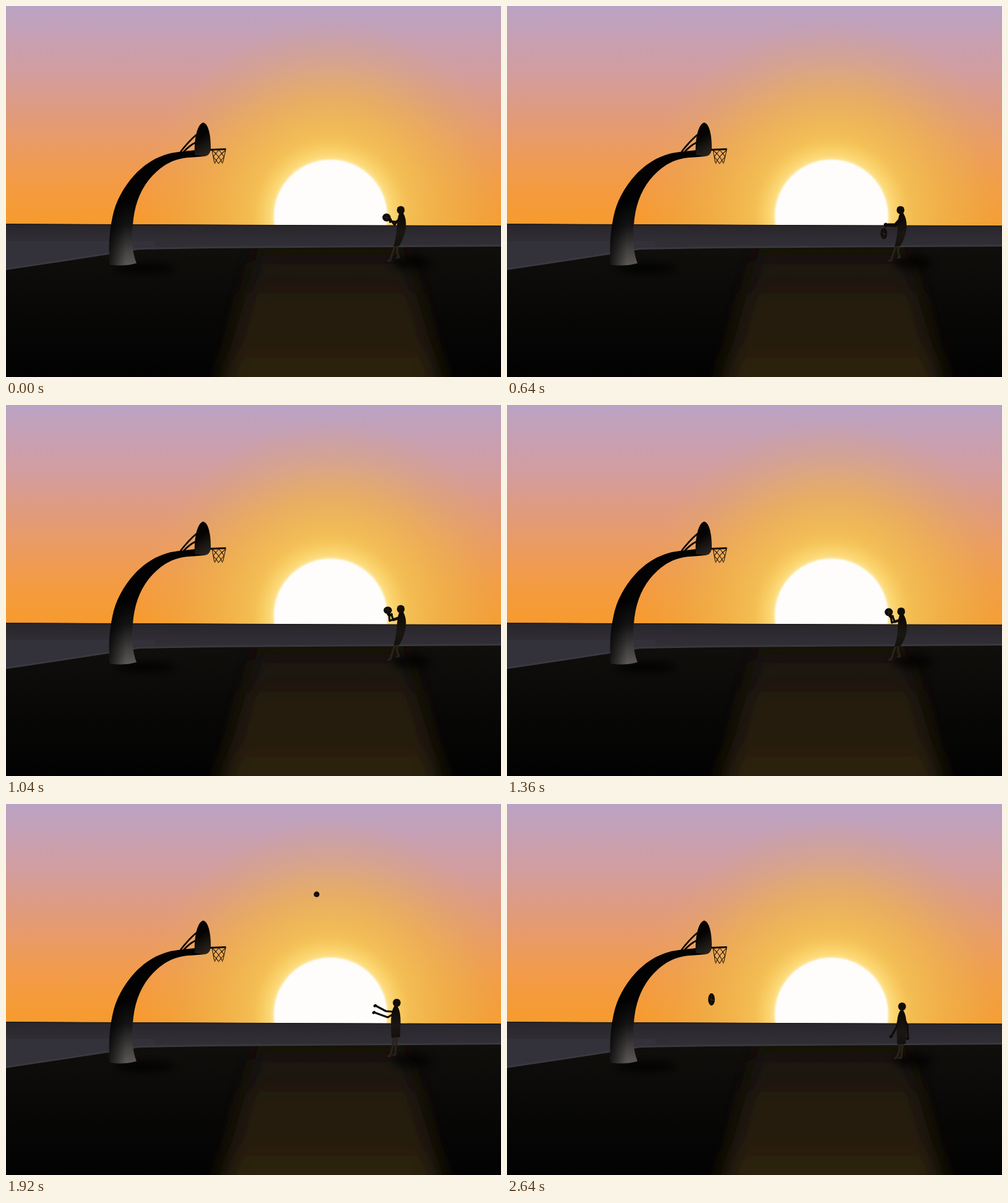
Write an HTML page that moves like this. It is 800x600 px and loops after 2.72 s.

```html
<!DOCTYPE html>
<html lang="en">
<head>
<meta charset="utf-8">
<title>Sunset shot</title>
<style>
html, body { margin: 0; width: 100%; height: 100%; overflow: hidden; background: #000; }
svg { display: block; width: 100%; height: 100%; }
</style>
</head>
<body>
<svg viewBox="0 0 800 600" preserveAspectRatio="none">
  <defs>
    <linearGradient id="sky" x2="0" y2="1">
      <stop offset="0" stop-color="#b9a3c4"/>
      <stop offset=".13" stop-color="#c5a0b5"/>
      <stop offset=".3" stop-color="#d29d9f"/>
      <stop offset=".45" stop-color="#dd9b84"/>
      <stop offset=".62" stop-color="#ea9b65"/>
      <stop offset=".8" stop-color="#f39b45"/>
      <stop offset="1" stop-color="#f79b2c"/>
    </linearGradient>
    <radialGradient id="glow" gradientUnits="userSpaceOnUse" cx="525" cy="335" r="310">
      <stop offset=".3" stop-color="#f8cd60"/>
      <stop offset=".42" stop-color="#f3c055" stop-opacity=".9"/>
      <stop offset=".62" stop-color="#eeb850" stop-opacity=".6"/>
      <stop offset=".82" stop-color="#e8b458" stop-opacity=".22"/>
      <stop offset="1" stop-color="#e4ae60" stop-opacity="0"/>
    </radialGradient>
    <radialGradient id="halo" gradientUnits="userSpaceOnUse" cx="524.5" cy="340" r="125">
      <stop offset=".7" stop-color="#fff3c4" stop-opacity=".95"/>
      <stop offset=".78" stop-color="#ffe28a" stop-opacity=".6"/>
      <stop offset="1" stop-color="#fbd060" stop-opacity="0"/>
    </radialGradient>
    <linearGradient id="sea" x2="0" y2="1">
      <stop offset="0" stop-color="#28262b"/>
      <stop offset=".5" stop-color="#2f2d33"/>
      <stop offset="1" stop-color="#333139"/>
    </linearGradient>
    <linearGradient id="ground" gradientUnits="userSpaceOnUse" x1="0" y1="390" x2="0" y2="600">
      <stop offset="0" stop-color="#100f0c"/>
      <stop offset=".4" stop-color="#0a0908"/>
      <stop offset="1" stop-color="#020202"/>
    </linearGradient>
    <linearGradient id="beam" gradientUnits="userSpaceOnUse" x1="0" y1="385" x2="0" y2="600">
      <stop offset="0" stop-color="#1d160b" stop-opacity=".5"/>
      <stop offset=".45" stop-color="#251c0c"/>
      <stop offset="1" stop-color="#2b210f"/>
    </linearGradient>
    <linearGradient id="pole" gradientUnits="userSpaceOnUse" x1="194" y1="419" x2="181" y2="318">
      <stop offset="0" stop-color="#5b5755"/>
      <stop offset=".25" stop-color="#413e3d"/>
      <stop offset=".62" stop-color="#151414"/>
      <stop offset="1" stop-color="#020202"/>
    </linearGradient>
    <linearGradient id="side" gradientUnits="userSpaceOnUse" x1="166" y1="0" x2="206" y2="0">
      <stop offset="0" stop-color="#000" stop-opacity=".75"/>
      <stop offset=".7" stop-color="#000" stop-opacity="0"/>
    </linearGradient>
    <linearGradient id="board" x1=".3" x2=".6" y2="1">
      <stop offset=".4" stop-color="#050403"/>
      <stop offset="1" stop-color="#2a241f"/>
    </linearGradient>
    <linearGradient id="cloth" x2="0" y2="1">
      <stop offset="0" stop-color="#0b0805"/>
      <stop offset=".6" stop-color="#1a1611"/>
      <stop offset="1" stop-color="#14100d"/>
    </linearGradient>
    <filter id="b1" x="-20%" y="-20%" width="140%" height="140%"><feGaussianBlur stdDeviation="1.3"/></filter>
    <filter id="b7" x="-50%" y="-100%" width="200%" height="300%"><feGaussianBlur stdDeviation="7"/></filter>
    <filter id="b22" x="-30%" y="-30%" width="160%" height="160%"><feGaussianBlur stdDeviation="18"/></filter>
    <clipPath id="above"><path d="M0 0H800V355.5L0 352.5Z"/></clipPath>
    <clipPath id="land"><path d="M0 427L100 412L165 402L215 394L330 392L800 389V600H0Z"/></clipPath>
  </defs>

  <g clip-path="url(#above)">
    <rect width="800" height="356" fill="url(#sky)"/>
    <rect width="800" height="356" fill="url(#glow)"/>
    <circle cx="524.5" cy="340" r="125" fill="url(#halo)"/>
    <circle cx="524.5" cy="340" r="91.5" fill="#fffdfc" filter="url(#b1)"/>
  </g>
  <path d="M0 352.5L800 355.5V400H0Z" fill="url(#sea)"/>
  <path d="M0 380H240V400L0 430Z" fill="#333139"/>
  <path d="M0 353L800 356" stroke="#1d1a1c" stroke-width="1.5"/>
  <path d="M0 426L100 411L165 401L215 393L330 391L800 388" fill="none" stroke="#413e44" stroke-width="2.5" filter="url(#b1)"/>
  <g clip-path="url(#land)">
    <rect y="380" width="800" height="220" fill="url(#ground)"/>
    <path d="M410 385H640L712 640H340Z" fill="url(#beam)" filter="url(#b22)"/>
    <ellipse cx="225" cy="424" rx="50" ry="7" filter="url(#b7)"/>
    <ellipse cx="656" cy="415" rx="32" ry="10" opacity=".75" filter="url(#b7)"/>
  </g>

  <g id="stand">
    <path id="pipe" d="M168 418C165 392 167 365 172 342C177 316 190 293 207 274C227 252 251 239 279 236L306 233L322 243L298 245C270 246 249 259 231 281C215 301 207 326 205 354C202 378 205 402 211 416Q190 422 168 418Z" fill="url(#pole)"/>
    <path d="M168 418C165 392 167 365 172 342C177 316 190 293 207 274C227 252 251 239 279 236L306 233L322 243L298 245C270 246 249 259 231 281C215 301 207 326 205 354C202 378 205 402 211 416Q190 422 168 418Z" fill="url(#side)"/>
    <path d="M308 208Q295 219 282 236M306 221Q296 226 287 236" fill="none" stroke="#0b0704" stroke-width="2.8"/>
    <path d="M305 237C304 216 309 190 319 188.500C328 191 331 212 331 229C331 239 326 243 320 243L305 241Z" fill="url(#board)"/>
    <path d="M330 232.500L355.500 231.500" stroke="#150d06" stroke-width="3"/>
    <path id="net" fill="none" stroke="#24170a" stroke-width="1.1"/>
  </g>

  <g id="player" stroke-linecap="round" stroke-linejoin="round">
    <path id="legs" fill="none" stroke="#2a211b" stroke-width="3.4"/>
    <path id="torso" fill="url(#cloth)"/>
    <path id="arms" fill="none" stroke="#100b07" stroke-width="3.2"/>
    <path id="hands" fill="none" stroke="#100b07" stroke-width="4.6"/>
    <ellipse id="head" rx="6.3" ry="6.6" fill="#120d09"/>
  </g>
  <g id="ball">
    <circle r="1" fill="#0e0a07"/>
    <path d="M-.7 -.3Q0 .3 .8 .1M-.1 -.8Q.3 0 -.2 .8" fill="none" stroke="#332a22" stroke-width=".13"/>
  </g>
</svg>

<script>
const LOOP = 2720, STEP = 80;
const el = id => document.getElementById(id);

// body: head, neck, middle, hem, half hem width; arms: elbow, hand twice; legs: knee, foot twice
const pose = (body, arms, legs) => [...body, ...arms, ...legs];
const bent = [638, 330, 639, 336, 642, 364, 631, 389, 4.5];
const bentLegs = [625, 398, 621, 411, 632, 398, 635, 406];
const hold = pose(bent, [628, 354, 621, 345, 630, 349, 622, 348], bentLegs);
const push = pose([636, 330, 638, 337, 642, 364, 631, 389, 4.5],
  [627, 353, 612, 353, 628, 356, 613, 355], bentLegs);
const lowHand = pose([636, 331, 638, 338, 642, 365, 631, 389, 4.5],
  [627, 355, 614, 362, 629, 357, 616, 363], bentLegs);
const ready = pose(bent, [620, 349, 619, 338, 626, 348, 623, 339], bentLegs);
const dip = pose([637, 334, 638, 340, 643, 368, 631, 391, 5],
  [622, 352, 620, 341, 627, 351, 623, 342], bentLegs);
const rise = pose([635, 318, 634, 325, 633, 350, 629, 376, 7],
  [620, 325, 614, 308, 626, 320, 619, 307], [624, 391, 620, 408, 629, 391, 630, 405]);
const shot = pose([631.5, 305.5, 629, 311, 628, 335, 628, 363, 9],
  [613, 298, 604, 284, 621, 297, 614, 284], [623, 380, 621, 399, 629, 380, 629, 397]);
const land = pose([631.5, 321.5, 630, 329, 630, 352, 630, 378, 7],
  [614, 335, 597, 326, 617, 345, 595, 337], [625, 392, 621, 407, 630, 392, 629, 405]);
const rest = pose([638.5, 327.5, 638, 336, 638, 360, 637.5, 389, 7],
  [629, 362, 621, 376, 647, 358, 648, 379], [634, 399, 630, 410, 638, 400, 637, 410]);

const moves = [[0, hold], [400, hold], [640, push], [720, lowHand], [880, push], [1040, ready],
  [1120, ready], [1280, dip], [1360, dip], [1520, rise], [1600, shot], [1680, shot],
  [1840, land], [2080, land], [2400, rest], [LOOP, rest]];

// x, y, radius x, radius y
const toss = [[0, [615, 342, 6.7, 6.5]], [560, [615, 342, 6.7, 6.5]], [640, [609, 368, 5.3, 9]],
  [720, [608, 394, 5.5, 8.500]], [800, [609, 403, 6.8, 5.5]], [880, [610, 380, 5.5, 8]],
  [960, [613, 350, 6, 7]], [1040, [617, 332, 6.8, 6]], [1120, [617, 331, 6.8, 6]],
  [1280, [617, 335, 6.6, 6.4]], [1360, [617, 335, 6.6, 6.4]], [1520, [613, 301, 6.6, 6.4]],
  [1600, [600, 265, 6.7, 6.4]]];
const drop = [[2400, [355, 214, 4.6, 6]], [2480, [341, 242, 4.7, 7]],
  [2560, [333, 278, 5, 9]], [2640, [330.5, 316, 5.4, 10]]];

function at(keys, t) {
  let i = 1;
  while (i < keys.length - 1 && keys[i][0] < t) i++;
  const [t0, a] = keys[i - 1], [t1, b] = keys[i];
  const k = Math.min(1, Math.max(0, (t - t0) / (t1 - t0)));
  return a.map((v, n) => v + (b[n] - v) * k);
}

function ballAt(t) {
  if (t <= 1600) return at(toss, t);
  if (t >= 2400) return at(drop, t);
  const n = (t - 1600) / STEP;
  const r = Math.max(4.6, 6.5 - n * .48);
  return [600 - 24.5 * n, 265 - 46.1 * n + 4.09 * n * n, r, r * .97];
}

function netPath(pull) {
  const p = (u, v) => {
    const left = 333 + 4 * v, right = 355 - 5 * v;
    return `${left + (right - left) * u} ${233 + (22 + pull) * v}`;
  };
  let d = "";
  for (let i = 0; i <= 4; i++) {
    const u = i / 4;
    const zig = s => {
      let x = u, dir = s;
      d += "M" + p(x, 0);
      for (let j = 1; j <= 4; j++) {
        if (x + dir / 4 > 1 || x + dir / 4 < 0) dir = -dir;
        x += dir / 4;
        d += "L" + p(x, j / 4);
      }
    };
    if (i % 2 === 0) { zig(1); zig(-1); }
  }
  return d + "M" + p(0, 0) + "L" + p(0, .9) + "M" + p(1, 0) + "L" + p(1, .9);
}

function drawPlayer(q) {
  const [hx, hy, nx, ny, mx, my, bx, by, w, ax, ay, cx, cy, dx, dy, ex, ey,
    kx, ky, fx, fy, lx, ly, gx, gy] = q;
  el("head").setAttribute("cx", hx);
  el("head").setAttribute("cy", hy);
  el("torso").setAttribute("d",
    `M${nx - 2.5} ${ny - 2}C${nx - 9} ${ny + 8} ${mx - 8} ${my} ${bx - w} ${by}` +
    `L${bx + w} ${by - 1}C${mx + 8} ${my} ${nx + 9} ${ny + 8} ${nx + 2.5} ${ny - 2}Z`);
  el("arms").setAttribute("d",
    `M${nx - 3} ${ny + 7}L${ax} ${ay}L${cx} ${cy}M${nx + 2} ${ny + 7}L${dx} ${dy}L${ex} ${ey}`);
  el("hands").setAttribute("d", `M${cx} ${cy}l-1 .5M${ex} ${ey}l-1 .5`);
  el("legs").setAttribute("d",
    `M${bx - w * .4} ${by - 2}L${kx} ${ky}L${fx} ${fy}l-3 .8` +
    `M${bx + w * .3} ${by - 2}L${lx} ${ly}L${gx} ${gy}l-3 .8`);
}

function draw(ms) {
  const t = Math.floor((ms % LOOP) / STEP) * STEP;
  // the held ball pauses before the dribble
  drawPlayer(at(moves, t > 400 && t < 640 ? 400 : t));
  const [x, y, rx, ry] = ballAt(t);
  el("ball").setAttribute("transform", `translate(${x} ${y}) scale(${rx} ${ry})`);
  el("net").setAttribute("d", netPath(t >= 2480 ? 3 : 0));
}

const start = performance.now();
function tick(now) {
  draw(Math.max(0, now - start));
  requestAnimationFrame(tick);
}
draw(0);
requestAnimationFrame(tick);
</script>
</body>
</html>
```
